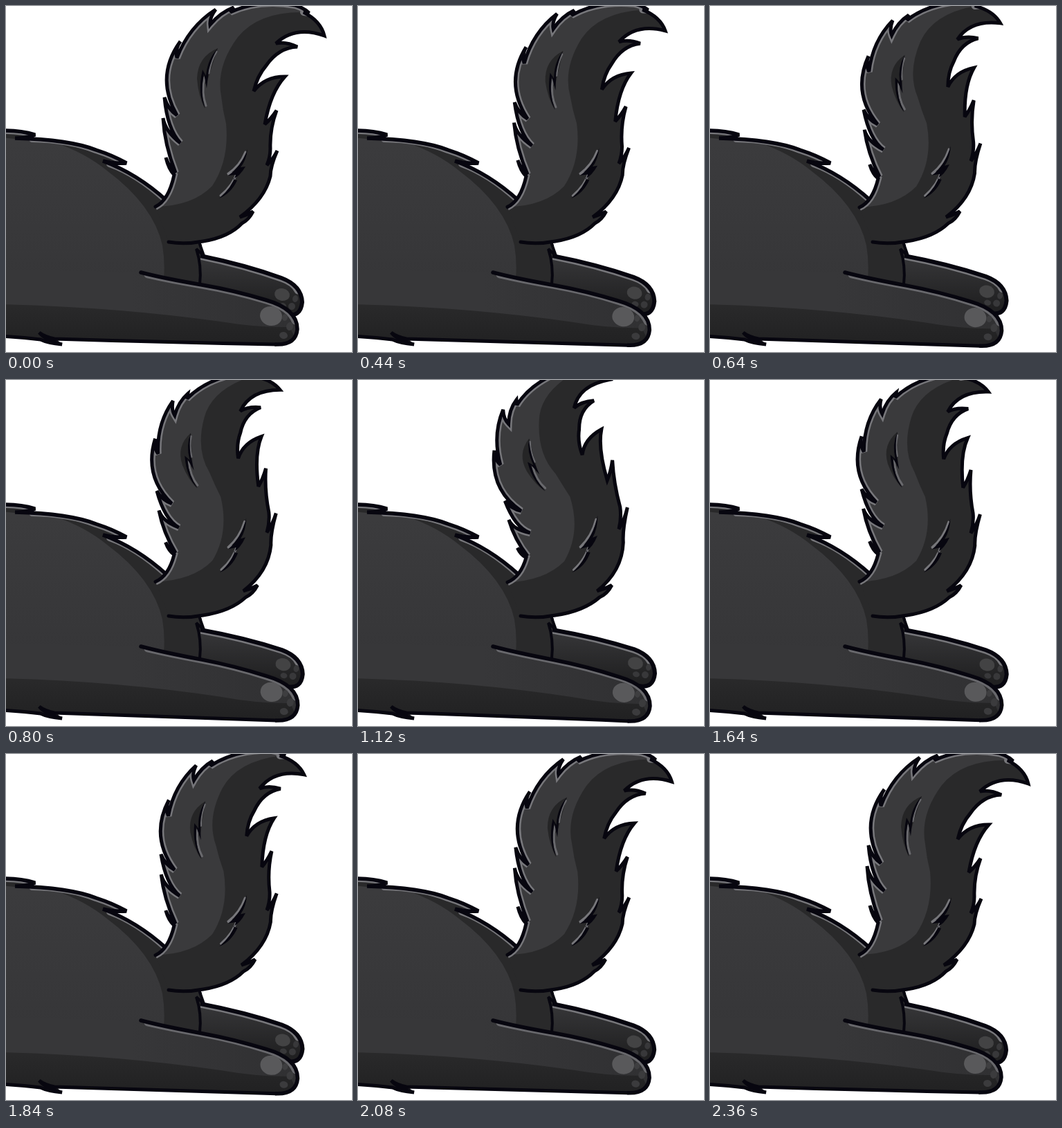
Write an HTML page with a canvas that moves like this. It is 500x500 px and loops after 2400 ms.

```html
<!DOCTYPE html>
<html lang="en">
<head>
<meta charset="utf-8">
<title>Wagging tail</title>
<style>
html, body { margin: 0; width: 100%; height: 100%; overflow: hidden; background: #fff; }
canvas { display: block; width: 500px; height: 500px; }
</style>
</head>
<body>
<canvas id="stage" width="500" height="500"></canvas>
<script>
const ctx = document.getElementById('stage').getContext('2d');
const LOOP = 2400;
const INK = '#07060f', DARK = '#29292a', LIGHT = '#3a3a3c', SHINE = '#77777b';

const tailLeft = `M216,290 Q235,281 243,244 Q235,236 231,219 Q236,233 245,241
  Q229,200 227,162 Q230,181 252,198 Q233,178 229,132 Q234,149 247,158
  Q215,102 252,51 Q244,63 247,75 Q264,30 303,5 Q294,17 295,27
  Q310,9 329,2 L324,9 Q365,-10 418,-1 Q431,3 438,10 L430,9`;
const tailRight = `Q455,22 460,43 Q418,28 390,54 Q405,51 421,59 Q394,60 376,86
  Q363,101 358,123 Q374,102 403,102 Q382,125 374,171 Q383,163 391,151 Q381,178 382,206
  Q382,218 377,230 Q386,221 392,209 Q382,232 382,246 Q374,279 338,305
  Q348,302 357,297 Q351,309 341,314 Q322,334 285,340 Q258,345 235,341`;
const tailLight = `M216,290 L200,130 L220,20 L320,-20 L440,-10 L430,9 Q365,8 335,45
  Q303,88 311,130 Q313,150 318,170 Q323,222 298,260 Q270,289 216,290 Z`;

const backLegTop = `M281,361 Q345,374 398,393 Q427,404 428,428 Q426,450 405,446`;
const backLeg = backLegTop + ` L340,426 L270,415 L276,355 Z`;
const bodyTop = `M-8,180 Q20,179 42,186 Q29,191 13,191 Q92,193 130,208 Q155,216 174,227
  Q156,228 140,224 Q189,242 232,281`;
const bodyFill = bodyTop + ` L283,345 Q278,375 282,403 L240,400 L200,470 L80,481 L-8,477 Z`;
const bodyLight = `M-8,190 L72,198 Q114,212 146,238 Q213,288 226,346 Q230,371 228,393
  L250,470 L-8,470 Z`;
const legTop = `M195,385 Q225,393 283,403 Q330,411 376,425 Q421,438 421,467
  Q419,490 390,489`;
const legFill = legTop + ` Q240,486 72,481 L81,489 Q60,487 50,482 L-8,477 L-8,380 Z`;
const legShade = `M-8,431 Q160,435 310,456 Q365,465 410,464 L425,495 L-8,495 Z`;
const belly = `M390,489 Q240,486 70,481 Q56,478 48,472 Q57,483 81,489 Q60,487 50,482 Q25,479 -8,477`;

const clamp = v => Math.max(0, Math.min(1, v));
const ramp = (from, to, v) => {
  const k = clamp((v - from) / (to - from));
  return k * k * (3 - 2 * k);
};

// Each warp bends a resting point by an amount from 0 to 1.
const bendTail = amount => (x, y) => {
  const lean = 97 * Math.pow(Math.max(0, 230 - y) / 225, 1.6);
  const squeeze = 0.18 * ramp(230, 50, y) * (x - 315);
  const pivot = 315 + 0.5 * Math.max(0, 145 - y);
  const lift = 0.47 * ramp(312, 150, y) * (x - pivot);
  const spread = 10 * ramp(230, 300, y) * ramp(290, 360, x);
  return [x + amount * (spread - lean - squeeze), y - amount * lift];
};
const swayFront = amount => (x, y) => [x + amount * ramp(250, 420, x), y + amount * 4 * ramp(200, 400, x)];
const swayBack = amount => (x, y) => [x + amount * ramp(285, 410, x), y - amount * 4 * ramp(285, 410, x)];
const still = (x, y) => [x, y];

const shape = (path, warp = still) => new Path2D(path.replace(
  /(-?\d+),(-?\d+)/g, (_, x, y) => warp(+x, +y).map(v => v.toFixed(2)).join(',')));

function fill(path, color) {
  ctx.fillStyle = color;
  ctx.fill(path);
}

function line(path, color, width) {
  ctx.strokeStyle = color;
  ctx.lineWidth = width;
  ctx.stroke(path);
}

function inside(path, draw) {
  ctx.save();
  ctx.clip(path);
  draw();
  ctx.restore();
}

function fade(x0, y0, c0, x1, y1, c1) {
  const g = ctx.createLinearGradient(x0, y0, x1, y1);
  g.addColorStop(0, c0);
  g.addColorStop(1, c1);
  return g;
}

function pad(warp, x, y, rx, ry, color) {
  const [px, py] = warp(x, y);
  ctx.fillStyle = color;
  ctx.beginPath();
  ctx.ellipse(px, py, rx, ry, 0.2, 0, 7);
  ctx.fill();
}

function drawBackLeg(swing) {
  const warp = swayBack(swing), toes = swayBack(swing * 2);
  const leg = shape(backLeg, warp);
  fill(leg, fade(0, 370, '#343436', 0, 435, '#202021'));
  inside(leg, () => line(shape('M281,361 Q345,374 398,393 Q416,399 422,411', warp), SHINE, 11));
  pad(toes, 399, 417, 11, 9, '#434344');
  pad(toes, 400, 433, 5, 4, '#38383a');
  pad(toes, 413, 434, 5, 5, '#38383a');
  pad(toes, 418, 423, 4, 5, '#38383a');
  line(shape(backLegTop, warp), INK, 6);
}

function drawBody(swing) {
  const warp = swayFront(swing), body = shape(bodyFill);
  fill(body, DARK);
  inside(body, () => {
    fill(shape(bodyLight), fade(0, 200, '#3b3b3d', 0, 400, '#363638'));
    line(shape('M-8,180 Q20,179 42,186 M38,192 Q92,193 130,208 Q155,216 174,227 M150,228 Q189,242 230,279'), SHINE, 10);
  });
  line(shape(bodyTop), INK, 5.5);
  line(shape('M280,344 L286,361 L275,351 Q283,375 280,402'), INK, 4);

  const leg = shape(legFill, warp);
  fill(leg, fade(180, 0, '#373739', 420, 0, '#303032'));
  inside(leg, () => {
    fill(shape(legShade, warp), fade(0, 435, '#29292a', 0, 490, '#212122'));
    line(shape('M205,388 Q240,396 283,403 Q330,411 376,425 Q410,435 418,455', warp), '#68686c', 11);
  });
  pad(warp, 383, 448, 16, 14, '#59595b');
  pad(warp, 403, 450, 4, 5, '#3e3e40');
  pad(warp, 410, 463, 5, 6, '#3b3b3d');
  pad(warp, 401, 476, 6, 5, '#3b3b3d');
  line(shape(legTop, warp), INK, 5.5);
  line(shape(belly, warp), INK, 5);
}

function drawTail(warp) {
  const outline = shape(tailLeft + tailRight, warp);
  fill(outline, DARK);
  inside(outline, () => {
    fill(shape(tailLight, warp), LIGHT);
    line(shape(tailLeft, warp), SHINE, 10);
  });
  fill(shape('M306,61 Q277,73 276,105 Q278,130 287,148 L284,118 L291,108 Z', warp), '#252526');
  line(shape('M304,66 Q296,78 293,97 M287,103 Q282,126 289,144', warp), '#69696d', 3);
  fill(shape('M306,61 Q297,76 293,93 L290,119 L286,98 Q280,126 288,148 Q276,127 284,92 L289,101 Q291,77 306,61 Z', warp), INK);
  line(shape('M346,211 Q338,231 320,243 L334,240 Q328,259 310,274', warp), '#77777b', 3);
  fill(shape('M349,207 Q347,223 339,233 L346,232 Q338,246 328,250 L334,252 Q325,271 308,278 Q326,263 332,244 L321,245 Q340,232 349,207 Z', warp), INK);
  line(outline, INK, 5);
}

function draw(now) {
  const swing = (1 - Math.cos(now % LOOP / LOOP * 2 * Math.PI)) / 2;
  ctx.clearRect(0, 0, 500, 500);
  ctx.lineJoin = 'miter';
  ctx.miterLimit = 3;
  ctx.lineCap = 'round';
  drawBackLeg(swing);
  drawBody(swing);
  drawTail(bendTail(Math.pow(swing, 1.5)));
  requestAnimationFrame(() => draw(performance.now() - start));
}

const start = performance.now();
draw(0);
</script>
</body>
</html>
```
